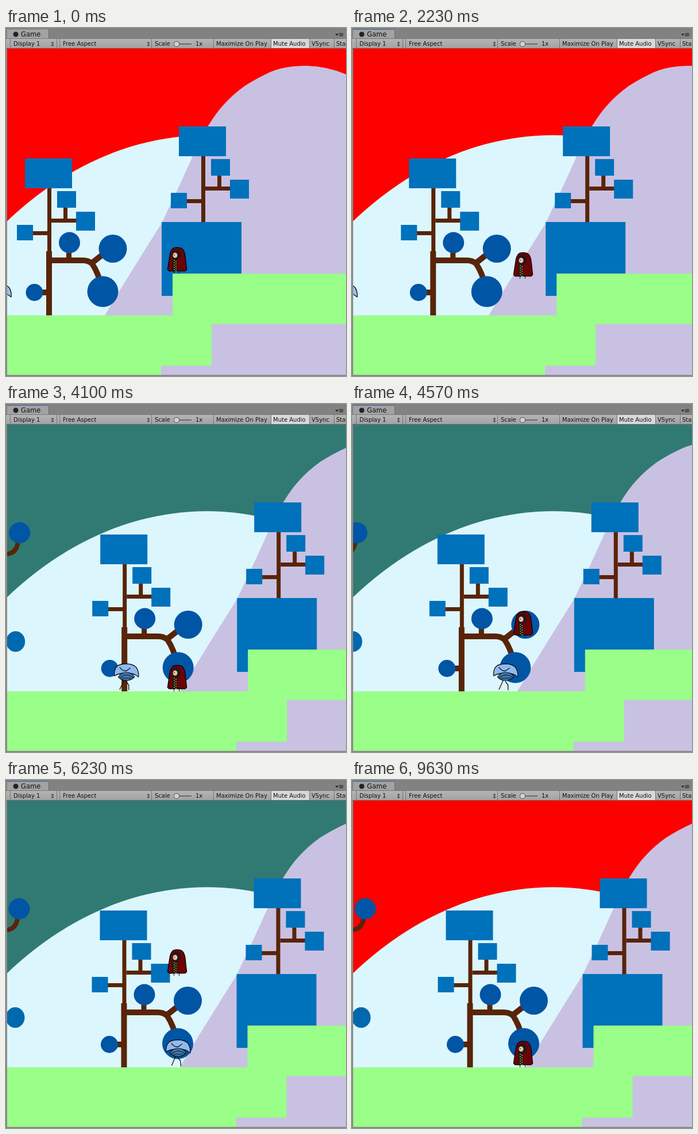
These frames come from a looping animation (592x608 px, 9.67 s). An HTML page with a canvas:

```html
<!DOCTYPE html>
<html lang="en">
<head>
<meta charset="utf-8">
<title>Game view</title>
<style>
  html, body { margin: 0; width: 100%; height: 100%; overflow: hidden; background: #828282; }
  canvas { display: block; }
</style>
</head>
<body>
<canvas id="stage" width="592" height="608"></canvas>
<script>
const ctx = document.getElementById('stage').getContext('2d');
const LOOP = 9670, GROUND = 502, LEDGE = 429;
const BROWN = '#592407', LEAF = '#0071bb', BALL = '#0055a5', LAVENDER = '#c9c1e2', GREEN = '#99ff88';
const FONT = '"DejaVu Sans", sans-serif';

function box(x, y, w, h, color) {
  ctx.fillStyle = color;
  ctx.fillRect(x, y, w, h);
}
function oval(x, y, rx, ry, color) {
  ctx.beginPath();
  ctx.ellipse(x, y, rx, ry, 0, 0, 7);
  ctx.fillStyle = color;
  ctx.fill();
}
function shape(d, fill, stroke, width = 1) {
  const path = new Path2D(d);
  if (fill) { ctx.fillStyle = fill; ctx.fill(path); }
  if (stroke) { ctx.strokeStyle = stroke; ctx.lineWidth = width; ctx.stroke(path); }
}
function text(str, x, y, size = 10) {
  ctx.font = `${size}px ${FONT}`;
  ctx.fillStyle = '#111';
  ctx.fillText(str, x, y);
}
function at(x, y, draw) {
  ctx.save();
  ctx.translate(x, y);
  draw();
  ctx.restore();
}
// Piecewise linear value through [time, value] points.
function track(points, t) {
  const i = points.findIndex(p => p[0] > t);
  if (i === 0) return points[0][1];
  if (i < 0) return points[points.length - 1][1];
  const [t0, a] = points[i - 1], [t1, b] = points[i];
  return a + (b - a) * (t - t0) / (t1 - t0);
}

// Game clock: the action stands still during two pauses.
const playTime = t => t - Math.min(Math.max(t - 3300, 0), 800) - Math.min(Math.max(t - 6600, 0), 630);

const scrollKeys = [[1930, 0], [2230, 66], [2530, 131.2], [3704, 131.2], [3770, 116],
  [3850, 100], [4850, 100], [5000, 130.5]];

function playerFeet(p) {
  if (p < 2700) {
    const fall = Math.max(p - 2096, 0) / 1000;
    return Math.min(LEDGE + 500 * fall * fall, GROUND);
  }
  for (const start of [3577, 4988]) {
    const s = (p - start) / 1000;
    if (s > 0 && s < 1.166) return GROUND - 583 * s + 500 * s * s;
  }
  return GROUND;
}

function enemyX(p, scroll) {
  const patrol = 290 - 0.156 * Math.abs(p - 4657);
  return p < 2830 ? Math.max(patrol, -12 - scroll) : patrol;
}

function squareTree() {
  box(72, 279, 7, 117, BROWN);
  box(79, 333, 44, 7, BROWN);
  box(100, 313, 7, 21, BROWN);
  box(46, 355, 27, 7, BROWN);
  box(33, 228, 82, 52, LEAF);
  box(89, 285, 33, 29, LEAF);
  box(122, 321, 33, 33, LEAF);
  box(19, 344, 28, 27, LEAF);
}

function roundTree() {
  box(70, 390, 10, 112, BROWN);
  shape('M78 406H134Q143 406 149 411L168 396M146 407Q156 418 163 440', null, BROWN, 10);
  box(105, 390, 9, 13, BROWN);
  box(63, 457, 8, 10, BROWN);
  oval(110.5, 375, 18.5, 18.5, BALL);
  oval(186, 385.5, 24.5, 24.5, BALL);
  oval(168.5, 460.5, 27, 27, BALL);
  oval(49.5, 462, 15, 15, BALL);
}

function player() {
  shape('M-5.5 -4V0M3.5 -4V0', null, '#111');
  shape('M-8 -43Q-6 -45.500 0 -45.500Q6 -45.500 9 -43Q13 -39 14 -30L16.500 -7L14 -4.500H-14' +
    'L-16.500 -7L-13 -30Q-12 -39 -8 -43Z', '#6b0306', '#150000', 1.5);
  shape('M-10 -30Q-9 -42 -2 -42Q6 -42 6 -30L3 -25H-7Z', '#24161a');
  oval(-3.5, -32, 4, 4.5, '#efc0a8');
  box(-6, -33, 2, 1, '#222');
  box(-8, -26, 8, 21, '#21160d');
  for (let y = -24; y < -6; y += 4) {
    box(-6, y, 2, 2, '#7d8b45');
    box(-3, y + 2, 2, 2, '#7d8b45');
  }
}

function enemy(p, calm) {
  const step = Math.sin(p / 90) * 2;
  const dome = 'M-21 21Q-22 10 -16 4Q-11 0 0 0Q11 0 17 6Q22 13 21 23Q14 16 0 16Q-13 16 -21 21Z';
  ctx.lineJoin = 'round';
  if (calm) {
    at(0, -48, () => {
      shape(`M-4 28L-8 37L${-10 + step} 45M-1 30L4 37L${6 + step} 46`, null, '#111', 1.3);
      shape(dome, '#8fbaf0', '#111', 1.3);
      shape('M-14 23Q-10 15 0 15Q10 15 14 23Q8 29 0 29Q-9 29 -14 23Z', '#3f79b5', '#111', 1.2);
      shape('M-11 24Q0 15 12 24M-8 25H8M-12 6L-8 10Q-2 15 3 10L7 7', null, '#111', 1.2);
    });
    return;
  }
  at(0, -55, () => {
    shape(`M-2 16V38L${-7 + step} 46L-8 54H-5M-2 38L${3 - step} 46L2 54H6`, null, '#111', 1.4);
    shape('M-2 24L-8 32L-19 30M-19 30L-16 33L-9 33M-2 24L3 26L2 31L-6 29', null, '#111', 1.2);
    shape(dome, '#9bbfe9', '#111', 1.3);
    oval(-2, 8, 9, 5.5, '#222');
    oval(-2, 8, 8, 4.7, '#ffdc23');
    oval(-2, 8, 4, 4.2, '#ef2616');
    oval(-2, 8, 1.5, 1.8, '#370b08');
  });
}

function world(t) {
  const p = playTime(t), calm = t >= 4100 && t < 7230;
  const scroll = track(scrollKeys, p);
  const drawEnemy = () => at(enemyX(p, scroll), GROUND, () => enemy(p, calm));

  box(0, 36, 592, 572, calm ? '#317a73' : '#ff0000');
  oval(350, 997.3, 600, 810, '#dcf6fd');
  at(scroll, 0, () => {
    shape('M172 502L197 460L244 384L271 341L302 275L326 222L352 171Q366 148 379 134' +
      'Q395 116 416 101Q438 87 460 77Q485 66 523 66Q560 67 592 81V608H172Z', LAVENDER);

    shape('M-131 262Q-113 262 -110 240', null, BROWN, 8);
    oval(-107.5, 225, 18.5, 18.5, BALL);
    oval(-114.5, 415, 16.5, 18, '#0069ad');

    at(268, -56, squareTree);
    box(271, 339, 139, 129, LEAF);
    if (!calm) drawEnemy();
    squareTree();
    roundTree();
    if (calm) drawEnemy();
    shape('M-200 502H290V429H600V517H358V590H270V608H-200Z', GREEN);
  });
  at(298, Math.round(playerFeet(p)), player);
}

function dropArrows(x) {
  shape(`M${x - 2.5} 27L${x} 24L${x + 2.5} 27ZM${x - 2.5} 29L${x} 32L${x + 2.5} 29Z`, '#333');
}

function toolbar(focused) {
  box(0, 0, 592, 19, '#828282');
  box(2, 2, 72, 17, '#a2a2a2');
  box(2, 2, 72, 1, focused ? '#3f66a8' : '#949494');
  box(74, 3, 1, 16, '#6c6c6c');
  oval(17, 11, 4.5, 4.5, '#222');
  text('Game', 26, 15, 11.5);
  shape('M573 10H579L576 13.500Z', '#222');
  for (const y of [9, 11, 13]) box(580, y, 7, 1, '#222');

  const shade = ctx.createLinearGradient(0, 19, 0, 36);
  shade.addColorStop(0, '#b4b4b4');
  shade.addColorStop(1, '#a2a2a2');
  box(0, 19, 592, 17, shade);
  box(0, 18, 592, 1, '#777');
  box(0, 35, 592, 1, '#696969');
  box(462, 19, 66, 16, '#d9d9d9');
  for (const x of [7, 88, 93, 253, 361, 461, 528, 571]) box(x, 19, 1, 17, '#777');

  text('Display 1', 13, 31);
  text('Free Aspect', 99, 31);
  text('Scale', 259, 31);
  text('1x', 330, 31);
  text('Maximize On Play', 366, 31);
  text('Mute Audio', 465, 31);
  text('VSync', 532, 31);
  text('Sta', 575, 31);
  dropArrows(81);
  dropArrows(248);
  box(297, 27, 26, 2, '#6b6b6b');
  oval(297, 28, 5, 5, '#555');
  oval(297, 28, 4, 4, '#d2d2d2');
}

function frame(now) {
  const t = now % LOOP;
  world(t);
  box(0, 36, 2, 572, '#8a8a8a');
  box(0, 606, 592, 2, '#8a8a8a');
  toolbar(t >= 1700);
  requestAnimationFrame(() => frame(performance.now()));
}
frame(0);
</script>
</body>
</html>
```
